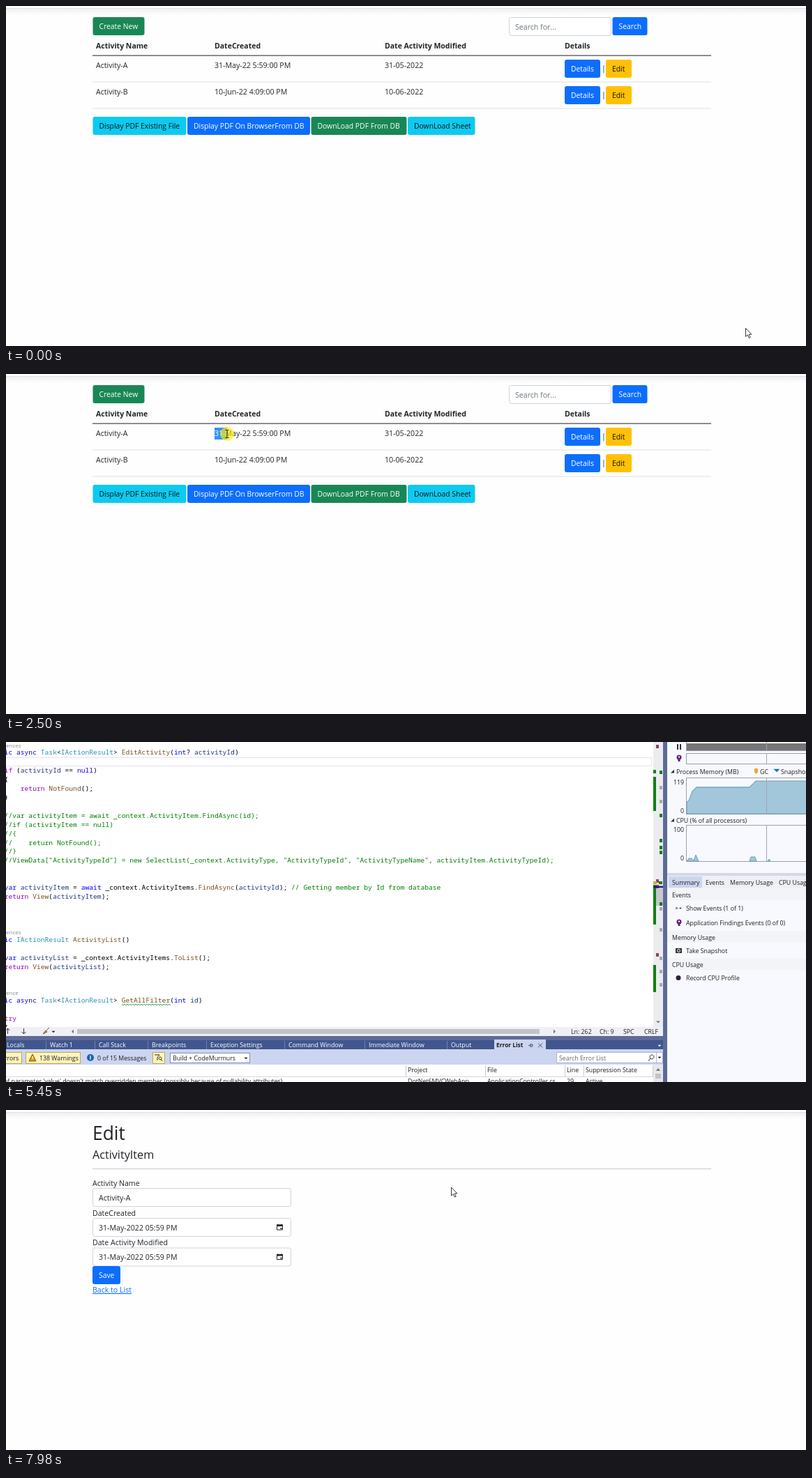
An HTML page that plays this animation: 1147x488 px, repeating every 8 s.

```html
<!DOCTYPE html>
<html lang="en">
<head>
<meta charset="utf-8">
<title>Activity list</title>
<style>
html, body { margin: 0; width: 100%; height: 100%; overflow: hidden; background: #fefefe; }
svg { display: block; width: 1147px; height: 488px; }
text { white-space: pre; font: 10.6px "Open Sans", "Noto Sans", sans-serif; fill: #212529; }
.btn { font-size: 10.35px; }
.head { font-weight: 700; font-size: 10.5px; }
.h1 { font-weight: 500; font-size: 26.4px; }
.h4 { font-weight: 500; font-size: 16.2px; }
.ui { font-size: 8.8px; fill: #1e1e1e; }
.bold { font-weight: 700; font-size: 8.4px; }
.lens { font-size: 8px; fill: #8a8a8a; }
.code { font: 500 9.67px "Noto Sans Mono", "DejaVu Sans Mono", monospace; fill: #000; }
.c0 { fill: #008000; } .c1 { fill: #0000ff; } .c2 { fill: #8f08c4; }
.c3 { fill: #2b91af; } .c4 { fill: #74531f; } .c5 { fill: #1f377f; }
</style>
</head>
<body>
<svg id="stage" viewBox="0 0 1147 488" xmlns="http://www.w3.org/2000/svg"></svg>
<script>
const BLUE = '#0d6efd', GREEN = '#198754', CYAN = '#0dcaf0', AMBER = '#ffc107';
const PANEL = '#f7f9fe', TOOLBAR = '#ccd5f0', FRAME = '#5d6b99';
const esc = s => s.replace(/&/g, '&amp;').replace(/</g, '&lt;');
const rect = (x, y, w, h, fill, more = '') =>
  `<rect x="${x}" y="${y}" width="${w}" height="${h}" fill="${fill}" ${more}/>`;
const box = (x, y, w, h, stroke, fill = '#fff', r = 0) =>
  rect(x + .5, y + .5, w - 1, h - 1, fill, `stroke="${stroke}" rx="${r}"`);
const text = (x, y, s, cls = '', more = '') =>
  `<text x="${x}" y="${y}" class="${cls}" ${more}>${esc(s)}</text>`;
const path = (d, stroke, fill = 'none', more = '') =>
  `<path d="${d}" stroke="${stroke}" fill="${fill}" ${more}/>`;
const button = (x, y, w, s, fill, ink = '#fff', id = '') =>
  rect(x, y, w, 26, fill, `rx="3" ${id}`) + text(x + 9, y + 17, s, 'btn', `style="fill:${ink}"`);
const group = (id, body) => `<g id="${id}">${body}</g>`;
const ui = (x, y, s, fill = '#1e1e1e', more = '') => text(x, y, s, 'ui', `style="fill:${fill}" ${more}`);
const down = (x, y, fill = '#1e1e1e', r = 2.5) => path(`M${x - r} ${y - r / 2}h${2 * r}l${-r} ${r}z`, 'none', fill);

const page = rect(0, 0, 1147, 488, '#fefefe') + rect(0, 4, 1147, 9, 'url(#shade)') +
  rect(0, 3, 1147, 1, '#dee2e6');

const DATE = '31-May-22 5:59:00 PM';

function listPage() {
  const row = (y, name, made, changed, id) =>
    text(129, y + 4, name) + text(299, y + 4, made) + text(543, y + 4, changed) +
    button(801, y - 8, 51, 'Details', BLUE) + text(854, y + 8, '|') +
    button(860, y - 8, 37, 'Edit', AMBER, '#111', id);
  const heads = [[129, 'Activity Name'], [299, 'DateCreated'], [543, 'Date Activity Modified'], [801, 'Details']];
  return page +
    button(124.5, 16, 74, 'Create New', GREEN) +
    box(721, 16, 147, 27, '#ced4da', '#fff', 3) +
    text(730, 33.5, 'Search for...', '', 'style="fill:#6c757d"') +
    button(869.5, 16, 50, 'Search', BLUE) +
    heads.map(([x, s]) => text(x, 61, s, 'head')).join('') +
    rect(124, 70.5, 887, 1.2, '#444') +
    row(85, 'Activity-A', DATE, '31-05-2022', 'id="editA"') + rect(124, 108.5, 887, 1, '#dee2e6') +
    row(123, 'Activity-B', '10-Jun-22 4:09:00 PM', '10-06-2022', '') + rect(124, 146.5, 887, 1, '#dee2e6') +
    button(124.5, 159, 134, 'Display PDF Existing File', CYAN, '#111') +
    button(260, 159, 176, 'Display PDF On BrowserFrom DB', BLUE) +
    button(437.5, 159, 137, 'DownLoad PDF From DB', GREEN) +
    button(576, 159, 96.5, 'DownLoad Sheet', CYAN, '#111') +
    group('caret', rect(672, 158, 1, 28, '#111')) +
    group('picked', '<clipPath id="clip"><rect id="range" y="77" height="17"/></clipPath>' +
      `<g clip-path="url(#clip)">${rect(299, 77, 110, 17, '#3390ff') +
      text(299, 89, DATE, '', 'style="fill:#fff"')}</g>`);
}

function editPage() {
  const calendar = y => path(`M388.5 ${y + 1.5}h8v7h-8zM390 ${y}v2M395 ${y}v2`, '#222') +
    rect(388, y + 1, 9, 2.5, '#222') + rect(393.5, y + 5.5, 2, 2, '#222');
  const field = (y, label, value, icon) =>
    text(124, y - 3.5, label) + box(124, y, 285, 27, '#ced4da', '#fff', 3) +
    text(133, y + 17.5, value) + (icon ? calendar(y + 8.5) : '');
  return page + text(124, 43, 'Edit', 'h1') + text(124, 69.5, 'ActivityItem', 'h4') +
    rect(124, 84, 887, 1, '#c8c9ca') +
    field(112, 'Activity Name', 'Activity-A') +
    field(155, 'DateCreated', '31-May-2022 05:59 PM', true) +
    field(197.5, 'Date Activity Modified', '31-May-2022 05:59 PM', true) +
    button(124, 224, 40, 'Save', BLUE) +
    text(124, 262, 'Back to List', '', `style="fill:${BLUE};text-decoration:underline"`);
}

const TOKENS = new RegExp([
  '(//.*)', '\\b(ic|async|var|await|int|null)\\b', '\\b(if|return|try)\\b', '\\b(Task|IActionResult)\\b',
  '\\b(EditActivity|NotFound|FindAsync|ActivityList|GetAllFilter|ToList|View)\\b',
  '\\b(activityId|activityItem|activityList|id)\\b'].join('|'), 'g');
const codeLine = (y, s) => `<text x="-2.4" y="${y}" class="code">` +
  esc(s).replace(TOKENS, (m, ...g) => `<tspan class="c${g.findIndex(Boolean)}">${m}</tspan>`) + '</text>';

function editor() {
  const first = [
    'ic async Task<IActionResult> EditActivity(int? activityId)', '',
    'if (activityId == null)', '{', '    return NotFound();', '}', '',
    '//var activityItem = await _context.ActivityItem.FindAsync(id);',
    '//if (activityItem == null)', '//{', '//    return NotFound();', '//}',
    '//ViewData["ActivityTypeId"] = new SelectList(_context.ActivityType, "ActivityTypeId", "ActivityTypeName", activityItem.ActivityTypeId);',
    '', '',
    'var activityItem = await _context.ActivityItems.FindAsync(activityId); // Getting member by Id from database',
    'return View(activityItem);'];
  const rest = [
    [287, 'ic IActionResult ActivityList()'],
    [312.5, 'var activityList = _context.ActivityItems.ToList();'],
    [325.5, 'return View(activityList);'],
    [374, 'ic async Task<IActionResult> GetAllFilter(int id)'],
    [400, 'try'], [413, '{']];
  let wave = 'M166 376';
  for (let x = 168; x <= 236; x += 2) wave += `L${x} ${x % 4 ? 376 : 378}`;
  const mark = (x, ys, fill) => ys.map(y => rect(x, y, 4, 5, fill)).join('');
  return rect(0, 0, 928, 409, '#fff') +
    group('oldLine', rect(96, 277, 71, 13, '#d6d6d6') + rect(167, 277, 10, 13, '#ececec')) +
    group('newLine', box(-2, 22, 928, 13, '#e4e4ee')) +
    text(0, 8, 'ences', 'lens') + text(0, 276, 'ences', 'lens') + text(0, 363, 'ence', 'lens') +
    first.map((s, i) => codeLine(18 + i * 12.95, s)).join('') +
    rest.map(([y, s]) => codeLine(y, s)).join('') + path(wave, '#2f9a4a', 'none', 'stroke-width=".9"') +
    rect(928, 0, 14, 409, '#ececf0') + rect(931, 205, 11, 30, '#c6c7d0') +
    [[50, 49], [205, 57], [320, 39]].map(([y, h]) => rect(928, y, 4, h, '#108010')).join('') +
    mark(928, [40], '#108010') + mark(937, [41, 103, 139, 149, 156, 230], '#108010') +
    mark(937, [63, 83, 237, 267, 308, 327, 346], '#a9a9ad') +
    mark(932, [4, 197, 205, 303], '#8b4558') + rect(928, 200, 5, 4, '#e0a040') + rect(936, 200, 5, 4, '#108010') +
    rect(928, 0, 14, 2, '#10108a', 'id="caretMark"') + down(935, 402, '#777', 3);
}

function statusBar() {
  const arrow = d => path(d, '#333');
  return rect(0, 409, 942, 13, '#eef0f6') +
    arrow('M2.5 419v-8m-3 3l3-3l3 3') + arrow('M25.5 411v8m-3-3l3 3l3-3') +
    path('M53 419l4-5l2 2zM58 414l4-4', '#6b5b2a', '#c9a54a') + down(68, 416) +
    path('M97 412.5v6l-3-3z', 'none', '#777') +
    rect(102, 412, 659, 7, '#c2c3c9', 'id="thumb"') +
    group('where', path('M781 412.5v6l3-3z', 'none', '#777') +
      ui(806, 418.5, 'Ln: 281', undefined, 'id="ln"') + ui(847, 418.5, 'Ch: 42', undefined, 'id="ch"')) +
    ui(885, 418.5, 'SPC') + ui(915, 418.5, 'CRLF');
}

function errorList() {
  const tabs = [[1, 'Locals'], [63, 'Watch 1'], [133, 'Call Stack'], [209, 'Breakpoints'], [293, 'Exception Settings'],
    [405, 'Command Window'], [520, 'Immediate Window'], [638, 'Output']];
  const heads = [[576, 'Project'], [690, 'File'], [804, 'Line'], [831, 'Suppression State']];
  const cells = [[-3, "of parameter 'value' doesn't match overridden member (possibly because of nullability attributes)"],
    [576, 'DotNet6MVCWebApp'], [690, 'ApplicationController.cs'], [804, '29'], [831, 'Active']];
  return rect(0, 422, 948, 66, FRAME) + rect(0, 428, 942, 14, '#40568d') +
    tabs.map(([x, s]) => ui(x, 438, s, '#fff') + (x > 1 ? rect(x - 6, 429, 1, 12, '#6f80ac') : '')).join('') +
    rect(700, 427, 74, 15, TOOLBAR) + text(703, 438, 'Error List', 'ui bold') +
    path('M749 435.5h3m0-2.5v5m0-4h3v3h-3M763 432.5l6 6m0-6l-6 6', '#44557f') + down(937, 436, '#fff') +
    rect(0, 441, 942, 22, TOOLBAR) +
    box(-9, 445, 32, 17, '#c9a54a', '#fdf4bf') + ui(-2, 456.5, 'rrors') +
    box(28, 445, 79, 17, '#c9a54a', '#fdf4bf') + path('M38 448l5 10h-10z', '#8a5a00', '#d9a10c') +
    rect(37.5, 451, 1.2, 4, '#fff') + ui(48, 456.5, '138 Warnings') +
    '<circle cx="121" cy="453" r="5" fill="#1a5fb4"/>' + rect(120.4, 450, 1.2, 6, '#fff') + ui(131, 456.5, '0 of 15 Messages') +
    box(210, 445, 18, 17, '#c9a54a', '#fdf4bf') + path('M213 449h7l-3 4v4M221 452a2 2 0 1 0 .1 0M222 455l2 3', '#333') +
    box(235, 446, 115, 15, '#8591b5') + ui(239, 456.5, 'Build + CodeMurmurs') + down(344, 454) +
    box(789, 445, 153, 16, '#aab3cd') + ui(793, 456.5, 'Search Error List', '#666') +
    path('M926 449a3 3 0 1 0 .1 0M924 454l-3 4', '#333') + rect(932, 446, 1, 14, '#aab3cd') + down(937, 453) +
    rect(0, 463, 928, 25, '#fff') + rect(928, 463, 14, 25, '#e8e8ec') + path('M932 472l3-4l3 4z', 'none', '#777') +
    rect(931, 476, 8, 7, '#c2c3c9') + rect(0, 480, 928, 1, '#d5d8e2') +
    [573, 687, 801, 828, 927].map(x => rect(x, 464, 1, 16, '#c5cadb')).join('') +
    [...heads.map(h => [...h, 474]), ...cells.map(c => [...c, 490])].map(([x, s, y]) => ui(x, y, s)).join('');
}

function diagnostics() {
  const title = (y, s) => path(`M958 ${y - 6}v5h-5z`, 'none', '#333') + ui(961, y, s);
  const right = (y, s, id = '') => ui(972, y, s, '#1e1e1e', `text-anchor="end" ${id}`);
  const tracks = [[-3, 16], [16, 16], [51, 53], [119, 53]];
  const bars = xs => xs.map(x => tracks.map(([y, h]) => rect(x, y, 1, h, '#9da3b5')).join('')).join('');
  const band = (y, s) => rect(948, y, 199, 17, '#f3f4f8') + ui(955, y + 12.5, s);
  const bulb = y => `<circle cx="965" cy="${y}" r="3.5" fill="#68217a"/>` +
    rect(963.5, y + 3, 3, 3, '#68217a') + rect(964, y - 1.5, 2, 2, '#fff');
  return rect(942, 0, 6, 488, FRAME) + rect(948, 0, 199, 488, PANEL) +
    rect(962, 3, 2, 8, '#333') + rect(966, 3, 2, 8, '#333') + bulb(22) +
    tracks.map(([y, h]) => box(975, y, 180, h, '#9ba0ad', PANEL)).join('') +
    title(45.5, 'Process Memory (MB)') + title(115.5, 'CPU (% of all processors)') +
    path('M1073 38h5v5l-2.5 3l-2.5-3z', 'none', '#e8a733') + ui(1081, 45.5, 'GC') +
    down(1105, 41, '#1a6fc0', 4.5) + ui(1111, 45.5, 'Snapshot') +
    right(61, '119', 'id="memory"') + right(102, '0') + right(129.3, '100') + right(170, '0') +
    group('before', rect(976, 56, 171, 47, '#a3c7da') + rect(976, 55.5, 171, 1, '#6a9fbc') + bars([1021, 1126])) +
    group('after', rect(976, 2, 171, 10, '#767676') +
      path('M976 103V88L979 86L984 74L990 69H1066L1075 61H1148V103z', '#6a9fbc', '#a3c7da', 'id="curve"') +
      path('M976 171l3-4h4l3 3l3-8l4 9zM1066 171l2-6h6l2 6zM1092 171l2-3l2 3z', '#6a9fbc', '#a3c7da') + bars([1090])) +
    rect(948, 188, 199, 4, '#d5d9e6') + rect(948, 192, 199, 18, '#eef0f6') + rect(950, 193, 48, 16, TOOLBAR) +
    [[955, 'Summary'], [1003, 'Events'], [1038, 'Memory Usage'], [1108, 'CPU Usage']].map(([x, s]) => ui(x, 204.5, s)).join('') +
    band(210, 'Events') + path('M960.5 238.5h3m2 0h3M961 237v3m6-3v3', '#777', 'none', 'stroke-width="1.5"') +
    ui(975, 242, 'Show Events (0 of 0)', undefined, 'id="events"') +
    bulb(258) + ui(975, 263, 'Application Findings Events (0 of 0)') +
    band(271, 'Memory Usage') + rect(960, 296, 9, 7, '#333') + '<circle cx="964.5" cy="299.5" r="2" fill="#333" stroke="#fff"/>' +
    ui(975, 303, 'Take Snapshot') + band(310.5, 'CPU Usage') +
    '<circle cx="964" cy="338.5" r="3.5" fill="#33203c"/>' + ui(975, 342, 'Record CPU Profile');
}

const pointer = group('pointer',
  '<circle id="press" r="10" fill="#fff000" opacity=".65"/>' +
  group('arrow', path('M.5.5V12.5L3.3 10L5.3 14.5L7.2 13.6L5.2 9.3H8.9z', '#222', '#fff', 'stroke-width=".9"')) +
  group('beam', path('M-2.5-5.5H-.5L0-5L.5-5.5H2.5M0-5V5M-2.5 5.5H-.5L0 5L.5 5.5H2.5', '#111')) +
  group('hand', path('M-1 0a1 1 0 0 1 2 0V5l5 1.2q1.5.5 1 3L6 14H0L-4 8.5q0-1.5 1.5-1L-1 9z', '#222', '#fff', 'stroke-width=".9"')));

document.getElementById('stage').innerHTML =
  '<linearGradient id="shade" x2="0" y2="1"><stop stop-color="#000" stop-opacity=".055"/><stop offset="1" stop-color="#000" stop-opacity="0"/></linearGradient>' +
  group('list', listPage()) + group('edit', editPage()) +
  group('ide', editor() + statusBar() + errorList() + diagnostics()) + pointer;

const $ = id => document.getElementById(id);
const show = (id, on) => $(id).setAttribute('display', on ? 'inline' : 'none');
const within = (t, a, b) => t >= a && t < b;

// start, end, steps, target x, target y, eased
const MOVES = [
  [70, 810, 11, 412, 84, true],
  [940, 1458, 8, 287, 86], [1532, 1680, 3, 299, 87],
  [1750, 2210, 5, 300, 87],
  [2430, 2500, 2, 317, 86], [2567, 3100, 9, 418, 93],
  [3300, 3710, 7, 914, 306, true],
  [3850, 3980, 3, 910, 160], [4045, 4370, 6, 877, 92],
  [4886, 5380, 7, 503, -4],
  [5450, 5450, 1, 585, 7], [6430, 6640, 4, 645, 111],
  [7380, 7380, 1, 649, 117], [7980, 7980, 1, 638, 110.5]];
const PRESSES = [[810, 1750], [2430, 3300], [3710, 3850], [4640, 4722]];

function pointerAt(t) {
  let x = 1060, y = 462;
  for (const [t0, t1, n, tx, ty, eased] of MOVES) {
    if (t < t0) break;
    const k = n > 1 ? Math.min(n, 1 + Math.floor((t - t0) / (t1 - t0) * (n - 1) + 1e-6)) : 1;
    let p = k / n;
    if (eased) p = p * p * (3 - 2 * p);
    x += (tx - x) * p;
    y += (ty - y) * p;
  }
  return [x, y];
}

function draw(t) {
  const [x, y] = pointerAt(t);
  const ide = within(t, 4722, 7380), edit = t >= 7380, list = !ide && !edit;
  show('list', list); show('ide', ide); show('edit', edit);

  const back = within(t, 940, 1980), forth = within(t, 2430, 3850);
  const edge = Math.min(409, Math.max(299, x));
  show('picked', back || forth);
  $('range').setAttribute('x', back ? edge : 299);
  $('range').setAttribute('width', back ? 409 - edge : edge - 299);
  show('caret', t >= 3850);

  const overEdit = list && within(x, 860, 897) && (within(y, 77, 103) || within(y, 115, 141));
  $('editA').setAttribute('fill', overEdit && y < 104 ? '#ffca2c' : AMBER);

  const hit = t >= 5050;
  show('oldLine', !hit); show('newLine', hit); show('before', !hit); show('after', hit);
  $('caretMark').setAttribute('y', hit ? 207 : 225);
  $('thumb').setAttribute('width', hit ? 663 : 659);
  $('where').setAttribute('transform', `translate(${hit ? 4 : 0})`);
  $('ln').textContent = hit ? 'Ln: 262' : 'Ln: 281';
  $('ch').textContent = hit ? 'Ch: 9' : 'Ch: 42';
  $('events').textContent = hit ? 'Show Events (1 of 1)' : 'Show Events (0 of 0)';
  $('memory').textContent = t >= 6840 ? '131' : '119';
  $('curve').setAttribute('transform', t >= 6840 ? '' : 'translate(0 103) scale(1 1.12) translate(0 -103)');

  const beam = ide ? t >= 4886 && y > 10
    : edit ? t < 7980 : within(x, 299, 409) && within(y, 77, 96);
  show('pointer', !within(t, 5450, 6430));
  show('press', PRESSES.some(([a, b]) => within(t, a, b)));
  show('beam', beam);
  show('hand', overEdit);
  show('arrow', !beam && !overEdit);
  $('pointer').setAttribute('transform', `translate(${x} ${y})`);
}

const begin = performance.now();
function tick(now) {
  draw(Math.max(0, now - begin) % 8000);
  requestAnimationFrame(tick);
}
draw(0);
requestAnimationFrame(tick);
</script>
</body>
</html>
```
